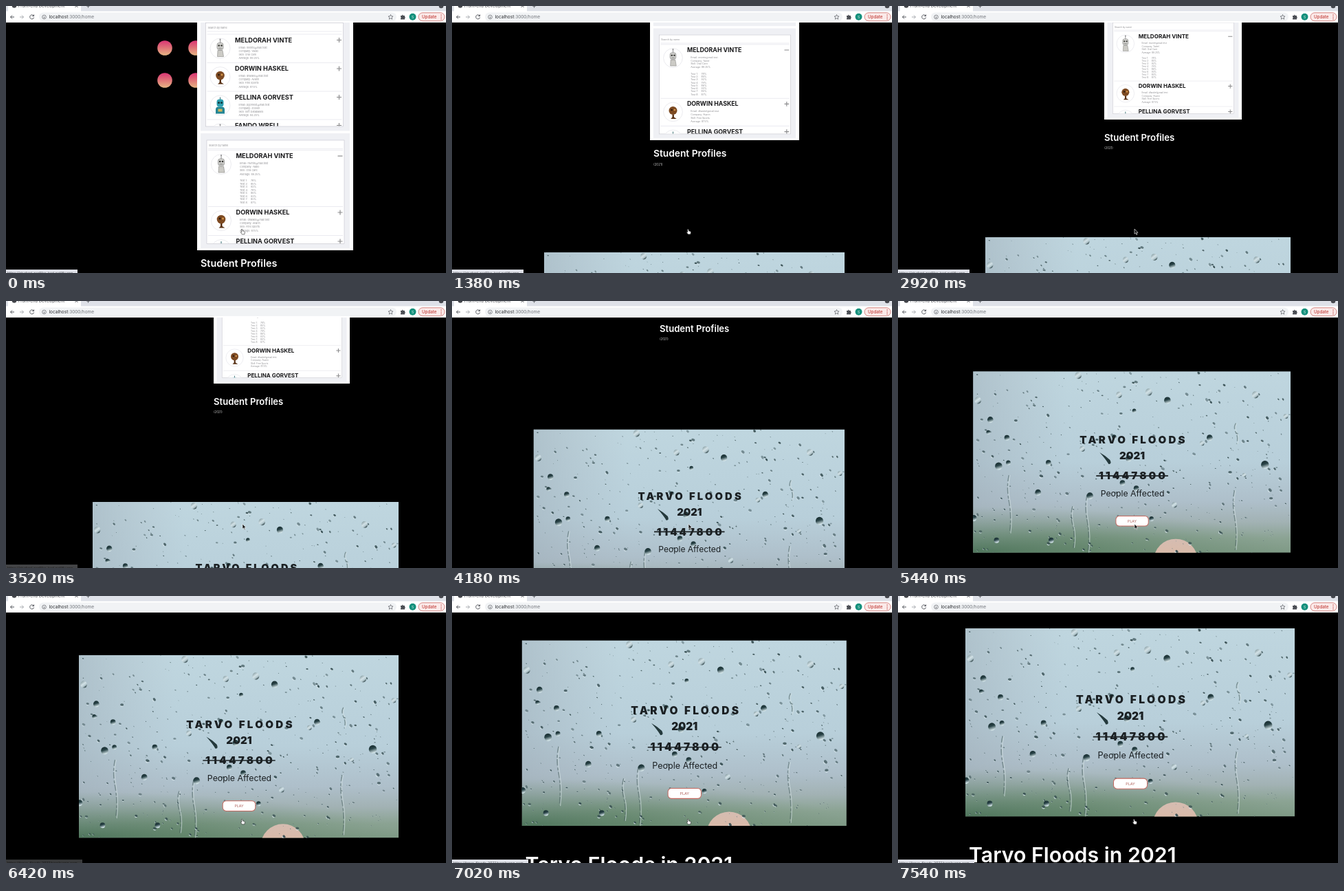
Write an HTML page that moves like this. It is 640 by 388 pixels and loops after 7.64 s.

```html
<!DOCTYPE html>
<html lang="en">
<head>
<meta charset="utf-8">
<title>Portfolio scroll</title>
<style>
html, body { margin: 0; width: 100%; height: 100%; overflow: hidden; background: #000; }
svg { display: block; width: 100%; height: 100%; font-family: Inter, sans-serif; }
.name { font-size: 9.2px; font-weight: 700; fill: #1a1a1c; }
.tiny { font-size: 3.7px; fill: #909094; white-space: pre; }
.rule { stroke: #dedee6; stroke-width: .6; }
.flood-text { fill: #1b2023; text-anchor: middle; }
.heavy { font-weight: 900; font-size: 15px; }
.icon { fill: none; stroke: #55585e; stroke-width: 1; }
</style>
</head>
<body>
<svg viewBox="0 0 640 388" preserveAspectRatio="none">
  <defs>
    <linearGradient id="sunset" x2="0" y2="1">
      <stop offset="0" stop-color="#da3574"/><stop offset=".5" stop-color="#e07478"/><stop offset="1" stop-color="#e6b684"/>
    </linearGradient>
    <linearGradient id="glass" x2="0" y2="1">
      <stop offset="0" stop-color="#bfd6df"/><stop offset=".5" stop-color="#b8cfda"/>
      <stop offset=".72" stop-color="#aebfca"/><stop offset=".83" stop-color="#a2b2b4"/>
      <stop offset=".92" stop-color="#8ba393"/><stop offset="1" stop-color="#7f9a86"/>
    </linearGradient>
    <linearGradient id="haze">
      <stop offset="0" stop-color="#9faeb8" stop-opacity=".5"/><stop offset=".3" stop-color="#a8b4be" stop-opacity="0"/>
    </linearGradient>
    <radialGradient id="field" cx="0" cy="1" r="1">
      <stop offset="0" stop-color="#3f6a4b" stop-opacity=".8"/><stop offset="1" stop-color="#5d8264" stop-opacity="0"/>
    </radialGradient>
    <linearGradient id="sun" x2="0" y2="1">
      <stop offset="0" stop-color="#d5bcb1"/><stop offset=".7" stop-color="#dfb9a0"/>
    </linearGradient>
    <linearGradient id="lightDrop" x2=".7" y2="1">
      <stop offset="0" stop-color="#6f878c"/><stop offset=".5" stop-color="#d3e2e7"/>
      <stop offset=".75" stop-color="#b3c7cd"/><stop offset="1" stop-color="#1d3236"/>
    </linearGradient>
    <linearGradient id="darkDrop" x2=".3" y2="1">
      <stop offset="0" stop-color="#14282b"/><stop offset=".5" stop-color="#284246"/><stop offset="1" stop-color="#d3e4e8"/>
    </linearGradient>
    <clipPath id="pane"><rect width="459" height="262"/></clipPath>
    <clipPath id="list"><rect x="292" y="195" width="200" height="150"/></clipPath>
  </defs>
  <rect width="640" height="388"/>
  <g id="dots" fill="url(#sunset)"></g>
  <g id="card"></g>
  <g id="title" fill="#fff">
    <text y="5" font-size="14.4" font-weight="600">Student Profiles</text>
    <text y="18.5" font-size="4.7" fill="#c6c6c6">(2021)</text>
  </g>
  <g id="flood"></g>
  <text id="heading" font-size="30.3" font-weight="600" fill="#fff">Tarvo Floods in 2021</text>
  <g id="status">
    <rect y="383" height="6" fill="#dfe1e8"/>
    <text x="2" y="389.5" font-size="5.2" fill="#4f5258"></text>
  </g>
  <g id="arrow"><path d="M344 324v7.2l1.7-1.4 1.2 2.6 1.1-.5-1.2-2.6h2.2z" fill="#111" stroke="#fff" stroke-width=".6"/></g>
  <g id="hand"><path d="M342.5 324.5q1-.8 1.5.4l.5 2 2.2.5q1 .4.7 1.8l-.5 2.6h-3.6l-2-3q0-1 1.6-.3z" fill="#fff" stroke="#222" stroke-width=".6"/></g>
  <g id="browser"></g>
</svg>
<script>
const LOOP = 7640;
const byId = id => document.getElementById(id);

let seed = 71;
const random = () => (seed = (seed * 16807) % 2147483647) / 2147483647;

const repeat = (count, make) => Array.from({ length: count }, (_, i) => make(i)).join('');

// Student list
const skeleton = `<path d="M0-14v5" stroke="#88888a"/><circle cy="-14" r="1" fill="#88888a"/>
  <rect x="-4.5" y="-9" width="9" height="10" rx="3" fill="#d3d3d0" stroke="#747472" stroke-width=".6"/>
  <circle cx="-1.8" cy="-5" r="1.3" fill="#363632"/><circle cx="2" cy="-5" r="1.3" fill="#363632"/>
  <path d="M-2.5-1.2h5M-2.5 4h6M-2.5 7h6" stroke="#6b6b68" stroke-width=".8"/>
  <path d="M-3.5 2h7l1.5 9h-9z" fill="#cccbc6" stroke="#747472" stroke-width=".5"/>`;
const brown = `<circle cy="-3" r="6.3" fill="#7d4a22"/><circle cx="-2" cy="-4" r="1.4" fill="#2e1a0c"/>
  <circle cx="2.5" cy="-4" r="1.4" fill="#d99a4c"/><path d="M-1 3h2.5v4l4 2.5h-9l2.5-2.5z" fill="#573014"/>`;
const teal = `<path d="M0-13v4" stroke="#31696e"/><rect x="-5" y="-10" width="10" height="11" rx="4" fill="#2f9fb0"/>
  <circle cx="-2" cy="-5" r="1.5" fill="#10373b"/><circle cx="2" cy="-5" r="1.5" fill="#10373b"/>
  <path d="M-6.5 11v-6q0-4 4-4h5q4 0 4 4v6z" fill="#238594"/><path d="M-3 4h6v4h-6z" fill="#d0b65b"/>`;

const students = [
  { name: 'MELDORAH VINTE', info: ['mvinte@mail.test', 'Yadel', 'Oral Care', '89.25%'], art: skeleton },
  { name: 'DORWIN HASKEL', info: ['dhaskel@mail.test', 'Avarin', 'Fine Sports', '87.5%'], art: brown },
  { name: 'PELLINA GORVEST', info: ['pgorvest@mail.test', 'Zoolen', 'Soft Databases', '84.25%'], art: teal },
  { name: 'FANDO WRELL', info: ['fwrell@mail.test', 'Oyola', 'Garden Work', '81.5%'], art: skeleton }
];
const labels = ['Email: ', 'Company: ', 'Skill: ', 'Average: '];

function student({ name, info, art }, y, open) {
  const scores = repeat(8, i =>
    `<text class="tiny" x="340" y="${y + 37.3 + i * 4.5}">Test ${i + 1}:</text>
     <text class="tiny" x="356" y="${y + 37.3 + i * 4.5}">${78 + i * 7 % 20}%</text>`);
  return `<path class="rule" d="M294 ${y - 8.5}h196"/>
    <circle cx="313" cy="${y + 12}" r="14.5" fill="#fff" stroke="#e2e2e8" stroke-width=".7"/>
    <g transform="translate(313 ${y + 13})">${art}</g>
    <text class="name" x="334.5" y="${y + 3.2}">${name}</text>
    ${repeat(4, i => `<text class="tiny" x="340" y="${y + 12.2 + i * 5.1}">${labels[i]}${info[i]}</text>`)}
    ${open ? scores : ''}
    <path d="M482.5 ${y}h7${open ? '' : `M486 ${y - 3.5}v7`}" stroke="#8a8a8c" stroke-width="1.2"/>`;
}

function screenshot(dy, rows, open) {
  return `<g transform="translate(${open ? 0 : -1.5} ${dy})">
    <rect x="${open ? 283 : 284.5}" y="185" width="217" height="167" fill="#eff0f4"/>
    <rect x="292" y="195" width="200" height="150.5" fill="#fff" stroke="#c4c4cc" stroke-width=".6"/>
    <g clip-path="url(#list)">
      <text class="tiny" x="295" y="203.5">Search by name</text>
      <path class="rule" d="M294 207.5h196"/>
      ${rows.map((y, i) => student(students[i], y, open && !i)).join('')}
    </g></g>`;
}

byId('card').innerHTML = `<rect x="278" y="-30" width="227" height="385" fill="#fff"/>`
  + screenshot(-170.5, [220, 261.5, 303, 344], false)
  + screenshot(0, [218, 300, 342], true);

byId('dots').innerHTML = [61, 108].map(y =>
  [231, 276].map(x => `<circle cx="${x}" cy="${y}" r="10.8"/>`).join('')).join('');

// Rainy window: x, y, radius of the larger drops
const lightDrops = [[152,6,5], [211,34,4.5], [254,30,5.2], [408,34,5], [7,42,5], [452,65,3.5],
  [158,112,4], [291,193,4], [331,104,3.5], [392,150,3]];
const darkDrops = [[281,42,5], [25,70,4.5], [49,96,4], [37,137,5.5], [51,132,3.5], [342,96,4.5],
  [422,135,6], [233,57,3], [169,180,5], [109,132,4], [94,175,4.5], [204,95,3.5], [225,126,4.5],
  [216,161,4], [236,169,4], [113,244,4], [34,244,4], [1,212,4.5], [258,213,3.5], [22,88,3]];

const drop = fill => ([x, y, r]) =>
  `<ellipse cx="${x}" cy="${y}" rx="${r * .95}" ry="${r}" fill="url(#${fill})"/>`;

// A small drop: dark body with a bright spot below it
const speck = () => {
  const r = .5 + random() ** 3 * 1.9;
  const x = random() * 459, y = random() * 262, tilt = random() * 60;
  return `<g transform="translate(${x.toFixed(1)} ${y.toFixed(1)}) rotate(${tilt.toFixed()}) scale(${r.toFixed(2)})"
    opacity="${(.4 + random() * .5).toFixed(2)}">
    <ellipse cy=".7" rx="1" ry=".8" fill="#dbe9ee"/><ellipse rx="1.2" ry=".8" fill="#2f474b"/></g>`;
};

const trail = (x, y, length) => {
  const d = `M${x} ${y}q-4 ${length * .2} 0 ${length * .45}t1 ${length * .55}`;
  return `<path d="${d}" stroke="#445c5c" stroke-width="1.6" stroke-dasharray="9 3 4 2" opacity=".5"/>
    <path d="${d}" stroke="#d8e5e6" stroke-width="1.2" transform="translate(1.4)" opacity=".6"/>`;
};

byId('flood').innerHTML = `<g clip-path="url(#pane)">
  <rect width="459" height="262" fill="url(#glass)"/>
  <rect width="459" height="262" fill="url(#haze)"/>
  <rect y="196" width="459" height="66" fill="url(#field)"/>
  <circle cx="293" cy="274" r="32" fill="url(#sun)"/>
  <g fill="none">${trail(144, 195, 60)}${trail(165, 178, 84)}${trail(52, 150, 84)}${trail(378, 172, 86)}${trail(380, 75, 30)}</g>
  ${repeat(430, speck)}
  <path d="M183 117q9 5 15 11 3 6-2 6-4-7-13-17z" fill="#24393c"/>
  ${lightDrops.map(drop('lightDrop')).join('')}${darkDrops.map(drop('darkDrop')).join('')}
  </g>
  <g class="flood-text">
    <text class="heavy" x="232" y="104.3" letter-spacing="3.2">TARVO FLOODS</text>
    <text class="heavy" x="230" y="127.3">2021</text>
    <text class="heavy" x="231.5" y="156.3" letter-spacing="3.1">11447800</text>
    <path d="M178 151h104" stroke="#1b2023" stroke-width="1.6"/>
    <text x="230.5" y="181" font-size="12.2">People Affected</text>
    <rect x="206.5" y="209" width="47" height="14.5" rx="5" fill="#fff" stroke="#c4685f"/>
    <text x="230" y="218.2" font-size="5.2" fill="#b0605a">PLAY</text>
  </g>`;

byId('browser').innerHTML = `
  <rect width="640" height="9" fill="#dee1e8"/>
  <path d="M3 9V0h106v9z" fill="#fff"/>
  <circle cx="12" cy="-.5" r="3.3" fill="#45474c"/>
  <text x="18" y="2" font-size="6" fill="#4a4c52">Front-end Development</text>
  <path class="icon" d="M100.5-2l4 4m0-4l-4 4M117 0h5m-2.5-3v5.5"/>
  <circle cx="633" r="3.3" fill="#46484e"/>
  <rect y="7.5" width="640" height="16.5" fill="#fff"/>
  <rect x="48" y="9.5" width="520" height="12.5" rx="6.2" fill="#f1f3f5"/>
  <path class="icon" d="M12 16H6.5l2.5-2.5M6.5 16l2.5 2.5"/>
  <path class="icon" style="stroke:#a8abb0" d="M20 16h5.5L23 13.5M25.5 16L23 18.5"/>
  <path class="icon" d="M40 14a3 3 0 1 0 .6 2.6M40.6 12.5v2.2h-2.2"/>
  <circle class="icon" cx="55.5" cy="16" r="2.8" style="stroke-width:.7"/><path class="icon" d="M55.5 15.5v2"/>
  <text x="62.5" y="18.3" font-size="6.5" fill="#26282c">localhost<tspan fill="#70747a">:3000/home</tspan></text>
  <path class="icon" style="stroke-width:.7" d="M559.5 12.5l1 2.3 2.5.2-1.9 1.7.6 2.5-2.2-1.3-2.2 1.3.6-2.5-1.9-1.7 2.5-.2z"/>
  <path d="M574 14h2q.8-3 1.8 0h2.2v2q2 .8 0 1.8v1.7h-6v-1.800q1.800-.8 0-1.700z" fill="#4c4f55"/>
  <circle cx="591.5" cy="15.8" r="5" fill="#14907c"/>
  <text x="591.5" y="17.8" font-size="5" fill="#e5f4f0" text-anchor="middle">S</text>
  <rect x="600" y="9.8" width="38" height="12" rx="6" fill="#fbeae9" stroke="#cc6a66" stroke-width=".8"/>
  <text x="605" y="18" font-size="6.2" font-weight="500" fill="#c2423e">Update</text>
  <path d="M633 12.5v7.5" stroke="#c2423e" stroke-width="1.3" stroke-dasharray="1.3 1.6"/>`;

// step, flood top, flood left, flood right, gap above it, card left, card right, title x, title offset, title scale
const poses = [
  [0, 518, 142, 571, 163, 278, 505, 283, 19, 1],
  [29, 358, 134, 571, 163, 288, 505, 293, 19, .955],
  [50, 336, 127, 571, 171, 300, 500, 300, 26, .92],
  [64, 336, 127, 571, 171, 300, 500, 300, 26, .92],
  [76, 292, 126, 571, 172, 302, 500, 302, 26, .91],
  [100, 119, 112, 571, 172, 302, 500, 302, 26, .91],
  [137, 86, 106, 571, 172, 302, 500, 302, 26, .91],
  [161, 47, 98, 577, 172, 302, 500, 302, 26, .91]
];

// Monotone cubic interpolation of one column
function sample(step, col) {
  const slope = i => (poses[i + 1][col] - poses[i][col]) / (poses[i + 1][0] - poses[i][0]);
  const last = poses.length - 1;
  const tangent = i => {
    if (i === 0) return slope(0);
    if (i === last) return slope(last - 1);
    const a = slope(i - 1), b = slope(i);
    return a * b <= 0 ? 0 : 2 * a * b / (a + b);
  };
  let i = 0;
  while (i < last - 1 && step > poses[i + 1][0]) i++;
  const h = poses[i + 1][0] - poses[i][0], u = (step - poses[i][0]) / h;
  const v = 1 - u;
  return poses[i][col] * v * v * (1 + 2 * u) + poses[i + 1][col] * u * u * (3 - 2 * u)
    + h * u * v * (tangent(i) * v - tangent(i + 1) * u);
}

// Every 140 ms holds three steps lasting 20, 100 and 20 ms
function stepAt(t) {
  const rest = t % 140;
  return Math.min(161, Math.floor(t / 140) * 3 + (rest < 20 ? 0 : rest < 120 ? 1 : 2));
}

const clamp = x => Math.max(0, Math.min(1, x));
const place = (id, x, y, s = 1, after = '') =>
  byId(id).setAttribute('transform', `translate(${x} ${y}) scale(${s}) ${after}`);

const [statusBox, statusText] = byId('status').children;

function draw(t) {
  const step = stepAt(t);
  const [top, left, right, gap, cardLeft, cardRight, titleX, titleDy, titleScale] =
    poses[0].slice(1).map((_, i) => sample(step, i + 1));
  const bottom = top - gap, scale = (right - left) / 459;

  place('dots', 0, bottom - 355);
  place('card', cardLeft, bottom, (cardRight - cardLeft) / 227, 'translate(-278 -355)');
  place('title', titleX, bottom + titleDy, titleScale);
  place('flood', left, top, scale);
  place('heading', left + 5, top + 262 * scale + 67);

  const late = step > 110;
  statusBox.setAttribute('width', late ? 111 : 104);
  statusText.textContent = late ? 'https://tarvo-floods-2021.herokuapp.com' : 'https://student-profiles-test.netlify.app';
  byId('status').setAttribute('opacity', late ? clamp((step - 136) / 4) : clamp((77.2 - step) / 4));

  const arrow = step >= 45 && step < 134;
  byId('arrow').setAttribute('visibility', arrow ? 'visible' : 'hidden');
  byId('hand').setAttribute('visibility', arrow ? 'hidden' : 'visible');
}

const start = performance.now();
function tick() {
  draw((performance.now() - start) % LOOP);
  requestAnimationFrame(tick);
}
tick();
</script>
</body>
</html>
```
